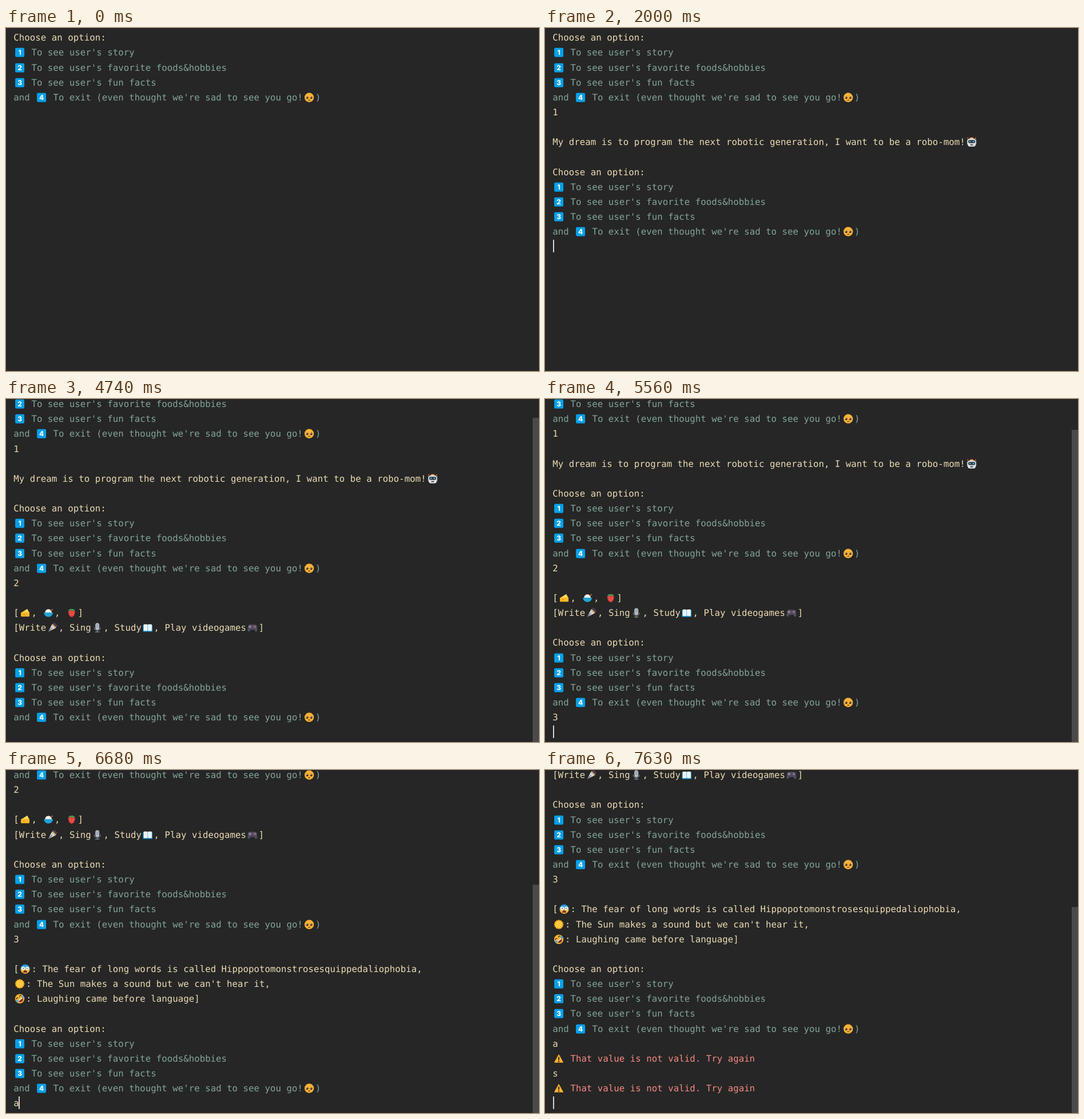
An HTML page with a canvas for the animation above (8000 ms loop, 932 by 601 pixels).

```html
<!DOCTYPE html>
<html lang="en">
<head>
<meta charset="utf-8">
<title>Terminal menu</title>
<style>
  html, body { margin: 0; width: 100%; height: 100%; overflow: hidden; background: #262626; }
  canvas { display: block; }
</style>
</head>
<body>
<canvas id="stage" width="932" height="601"></canvas>
<script>
const ctx = document.getElementById('stage').getContext('2d');
const W = 932, H = 601, LOOP = 8000, TICK = 60;
const LEFT = 13.3, CELL = 9.5, PITCH = 26.15, BASE = 22.7, CARET_TOP = 5, EMOJI = 21.6;
const LAST_ROW = 25, LAST_SCROLL = 86.6;
const FONT = '15.78px "DejaVu Sans Mono", "Noto Sans Mono", monospace';
const CREAM = '#ebdbb2', TEAL = '#83a598', RED = '#f48a82', INK = '#3a2a20';

const menu = [
  ['Choose an option:', CREAM],
  ["{1} To see user's story", TEAL],
  ["{2} To see user's favorite foods&hobbies", TEAL],
  ["{3} To see user's fun facts", TEAL],
  ["and {4} To exit (even thought we're sad to see you go!{plead})", TEAL]
];
const answer = (...rows) => [['', CREAM], ...rows.map(r => [r, CREAM]), ['', CREAM], ...menu];
const invalid = [['{warn} That value is not valid. Try again', RED]];

// Each turn: the caret may blink out, a key is typed, enter is hit, the reply is printed
const turns = [
  { blink: 1170, key: '1', typed: 1350, enter: 1730, reply: 2000, rows: answer(
    'My dream is to program the next robotic generation, I want to be a robo-mom!{robot}') },
  { blink: 2670, key: '2', typed: 3180, enter: 3740, reply: 3930, rows: answer(
    '[{cheese}, {rice}, {berry}]',
    '[Write{pen}, Sing{mic}, Study{book}, Play videogames{pad}]') },
  { blink: 4740, key: '3', typed: 4930, enter: 5560, reply: 5750, rows: answer(
    '[{fear}: The fear of long words is called Hippopotomonstrosesquippedaliophobia,',
    "{sun}: The Sun makes a sound but we can't hear it,",
    '{rofl}: Laughing came before language]') },
  { key: 'a', typed: 6680, enter: 7000, reply: 7000, rows: invalid },
  { key: 's', typed: 7440, enter: 7630, reply: 7630, rows: invalid }
];

const scrollFor = row => Math.max(0, LAST_SCROLL + (row - LAST_ROW) * PITCH);

// Short hops jump, long ones ease out over three ticks
function glide(from, to, elapsed) {
  if (to - from < 100) return to;
  const p = Math.min(1, (Math.floor(elapsed / TICK) + 1) / 3);
  return to - (to - from) * (1 - p) ** 3;
}

function stateAt(t) {
  const lines = [...menu];
  let row = lines.length, col = 0, caret = t >= 350, scroll = 0;
  for (const turn of turns) {
    if (t >= turn.blink) caret = false;
    if (t < turn.typed) break;
    lines.push([turn.key, CREAM]);
    caret = true;
    col = 1;
    if (t < turn.enter) break;
    row = lines.length;
    col = 0;
    scroll = scrollFor(row);
    if (t < turn.reply) break;
    lines.push(...turn.rows);
    row = lines.length;
    scroll = glide(scroll, scrollFor(row), t - turn.reply);
  }
  return { lines, row, col, caret, scroll };
}

// Shape helpers, all relative to the emoji centre
function oval(color, x, y, rx, ry = rx, turn = 0) {
  ctx.fillStyle = color;
  ctx.beginPath();
  ctx.ellipse(x, y, rx, ry, turn, 0, Math.PI * 2);
  ctx.fill();
}
function half(color, y, rx, ry, from = 0) {
  ctx.fillStyle = color;
  ctx.beginPath();
  ctx.ellipse(0, y, rx, ry, 0, from, from + Math.PI);
  ctx.fill();
}
function box(color, x, y, w, h, r = 0) {
  ctx.fillStyle = color;
  ctx.beginPath();
  ctx.roundRect(x, y, w, h, r);
  ctx.fill();
}
function poly(color, ...points) {
  ctx.fillStyle = color;
  ctx.beginPath();
  for (const [x, y] of points) ctx.lineTo(x, y);
  ctx.closePath();
  ctx.fill();
}
function bow(color, x, y, r, from = Math.PI) {
  ctx.strokeStyle = color;
  ctx.lineWidth = 1.2;
  ctx.beginPath();
  ctx.arc(x, y, r, from, from + Math.PI);
  ctx.stroke();
}
const pair = draw => [-1, 1].forEach(draw);
function ring(count, radius, draw) {
  for (let i = 0; i < count; i++) {
    const a = i * 2 * Math.PI / count;
    draw(Math.cos(a) * radius, Math.sin(a) * radius);
  }
}
function keycap(digit) {
  box('#05a1ea', -8, -8, 16, 16, 2);
  ctx.fillStyle = '#fff';
  ctx.font = '800 12px Inter, sans-serif';
  ctx.textAlign = 'center';
  ctx.fillText(digit, 0, 4.4);
}

const emoji = {
  plead() {
    oval('#fbb034', 0, 0, 8.2);
    pair(s => {
      oval(INK, s * 3.5, 0.4, 2, 2.2);
      oval('#fff', s * 3.5 - 0.6, -0.5, 0.8);
    });
    bow(INK, 0, 5.6, 1.3);
  },
  robot() {
    pair(s => {
      oval('#d8463c', s * 6.8, -6.6, 1.3);
      box('#9aa4aa', s * 7.2 - 1, -4, 2, 8);
    });
    box('#f2a13a', -3, -8, 6, 3, 1);
    box('#dfe3e6', -7, -6, 14, 14, 4);
    box('#30383f', -6, -3.5, 12, 5.5, 2);
    pair(s => oval('#45c3ee', s * 3, -0.7, 1.3));
    box('#4a5258', -2.5, 4, 5, 2);
  },
  cheese() {
    poly('#ffd75a', [-7.5, 0], [3.5, -7], [7.5, 0]);
    box('#fbb926', -7.5, -1, 15, 7.5, 1);
    oval('#e99a1c', -2, 3, 1.6);
  },
  rice() {
    half('#f5f1e8', 0, 6, 6.5, Math.PI);
    poly('#c9793f', [2, -3], [7, -7], [8, -5.5]);
    half('#20a4d8', -0.5, 8, 7.5);
  },
  berry() {
    half('#e43d3d', -2.5, 6, 10);
    half('#e43d3d', -2, 6, 3, Math.PI);
    pair(s => oval('#3c9e4b', s * 2.6, -5, 3, 1.5, s * 0.4));
    ring(5, 2.6, (x, y) => oval('#ffc46b', x, y + 1, 0.6));
  },
  pen() {
    ctx.rotate(Math.PI / 4);
    box('#4b3d59', -4.5, -9, 9, 4);
    box('#e8ba58', -4.5, -5, 9, 2);
    poly('#d4d4d8', [-4.5, -3], [4.5, -3], [0, 10]);
    box('#4d4d55', -0.5, 1, 1, 8);
  },
  mic() {
    bow('#6f7a82', 0, -0.5, 5.5, 0);
    box('#6f7a82', -1, 5, 2, 3);
    box('#6f7a82', -4, 6.7, 8, 1.6, 0.8);
    box('#bcc5ca', -3.5, -8.3, 7, 12, 3.5);
    for (let y = -6; y < 1; y += 2.5) box('#7b868d', -2.5, y, 5, 1);
  },
  book() {
    box('#159ad8', -8.3, -5, 16.6, 12, 1);
    pair(s => box('#eff4f7', s * 3.7 - 3.4, -6, 6.8, 11.5, 1));
  },
  pad() {
    box('#514b60', -8, -5.5, 16, 9, 4);
    pair(s => oval('#514b60', s * 5.8, 2.5, 2.6, 4.4, s * -0.25));
    ring(4, 1.4, (x, y) => {
      oval('#c8c3d4', x - 4.2, y - 1.6, 0.8);
      oval('#d98a8a', x + 4.2, y - 1.6, 0.8);
    });
  },
  fear() {
    const g = ctx.createLinearGradient(0, -8, 0, 8);
    ['#168ee0', '#4eacd7', '#f9b63a', '#f9b63a'].forEach((c, i) => g.addColorStop(i / 3, c));
    oval(g, 0, 0, 8.2);
    pair(s => {
      oval('#fff', s * 3.5, -1.2, 2.9);
      oval(INK, s * 3.3, -1.2, 0.9);
    });
    half('#7d2d2a', 6.3, 3.5, 4, Math.PI);
  },
  sun() {
    ring(12, 6.6, (x, y) => oval('#f7a41d', x, y, 1.8));
    oval('#ffc83b', 0, 0, 6.6);
  },
  rofl() {
    ctx.rotate(-0.65);
    oval('#fbb530', 0, 0, 8.2);
    half('#7d2d2a', 0.8, 5, 5.5);
    box('#fff', -4.3, 0.8, 8.6, 1.6);
    pair(s => {
      bow(INK, s * 3.5, -2.4, 1.8);
      oval('#35a9e8', s * 6.4, 0.5, 1.6, 2.5, s * -0.5);
    });
  },
  warn() {
    poly('#fbb02d', [0, -7], [7.5, 6.5], [-7.5, 6.5]);
    ctx.lineJoin = 'round';
    ctx.strokeStyle = '#fbb02d';
    ctx.stroke();
    box('#2b2520', -1, -3, 2, 5.8, 0.8);
    oval('#2b2520', 0, 4.9, 1.2);
  }
};

function drawLine([text, color], y) {
  let x = LEFT;
  text.split(/\{(\w+)\}/).forEach((part, i) => {
    if (i % 2) {
      ctx.save();
      ctx.translate(x + EMOJI / 2, y - 5.3);
      emoji[part] ? emoji[part]() : keycap(part);
      ctx.restore();
      x += EMOJI;
    } else {
      ctx.fillStyle = color;
      ctx.fillText(part, x, y);
      x += part.length * CELL;
    }
  });
}

// The scroll track begins a little above the stage
function drawThumb(scroll) {
  const hidden = 22, view = H + hidden;
  const top = Math.round(view * scroll / (view + scroll) - hidden);
  box('#4a4a4a', 921, top, 11, H - top);
}

function draw(t) {
  const { lines, row, col, caret, scroll } = stateAt(t);
  const rowY = (i, offset) => Math.floor(offset + i * PITCH - scroll);
  ctx.fillStyle = '#262626';
  ctx.fillRect(0, 0, W, H);
  ctx.font = FONT;
  ctx.textRendering = 'geometricPrecision';
  lines.forEach((line, i) => drawLine(line, rowY(i, BASE)));
  if (caret) box('#d4d4d4', Math.round(LEFT + 0.3 + col * (CELL - 1)), rowY(row, CARET_TOP), 2, 22);
  if (scroll) drawThumb(scroll);
}

const start = performance.now();
function tick() {
  draw((performance.now() - start) % LOOP);
  requestAnimationFrame(tick);
}
tick();
</script>
</body>
</html>
```
